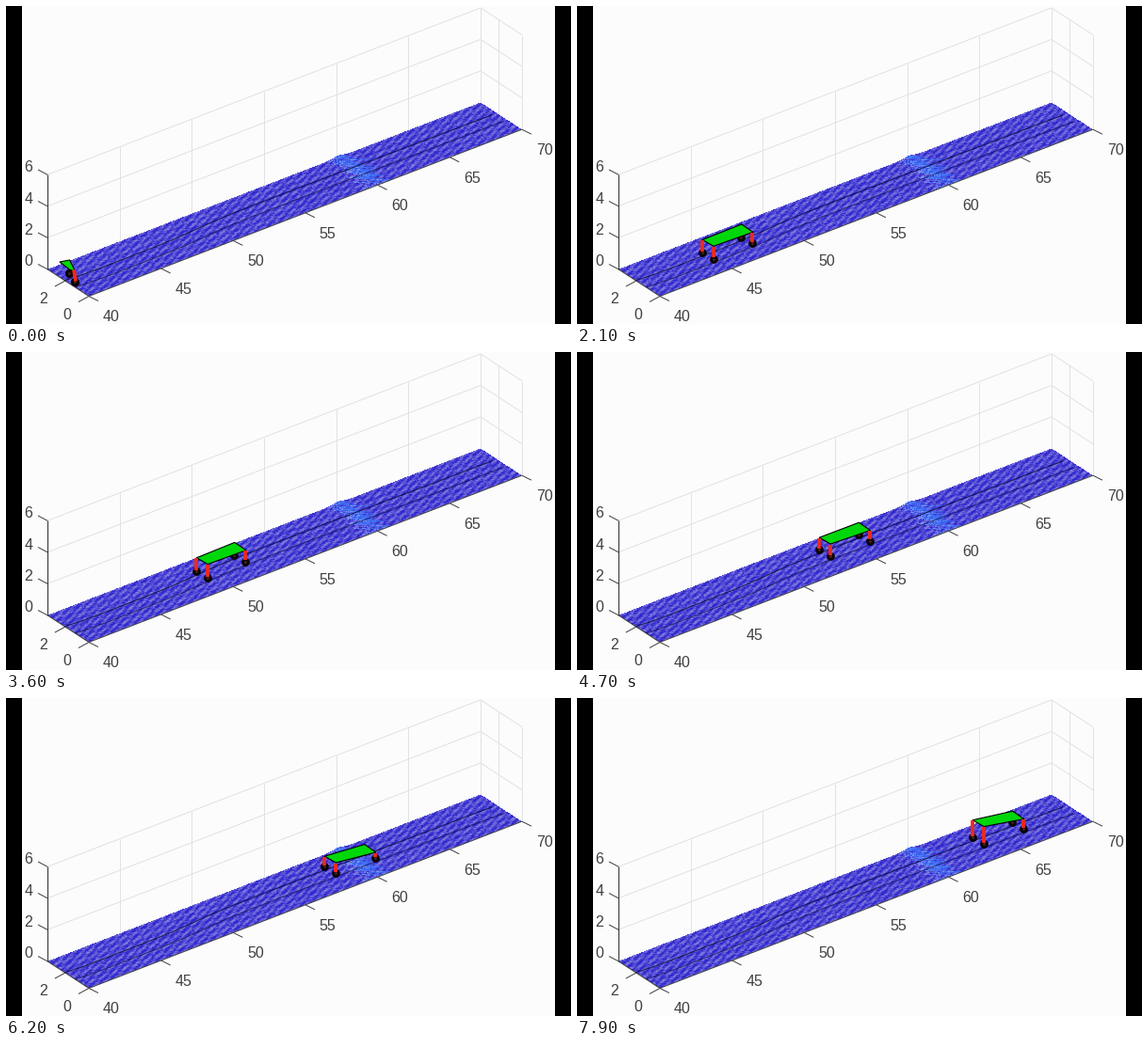
Write a matplotlib script that moves like this. It is 600 px wide and 338 px high and loops after 8000 ms.

```python
import numpy as np
import matplotlib.pyplot as plt
from matplotlib.animation import FuncAnimation
from matplotlib.patches import Polygon, Rectangle

W, H, DPI = 600, 338, 100
PX = 72 / DPI
FRAMES, INTERVAL = 80, 100
Y_MAX, Z_MAX = 3.5, 6
INK, GRID = "#404040", "#e2e2e4"
BUMP = 20.2

# Frames on which the plot is not refreshed
HELD = {4, 9, 15, 17, 20, 25, 33, 39, 41, 49, 57, 63, 65, 71, 73, 76}


def project(u, y, z=0):
    """Axis coordinates (u = x - 40) to stage pixels."""
    return 88 + 15.33 * u - 12.57 * y, 308.5 - 5.91 * u - 8.2 * y - 16.75 * z


def unproject(px, py):
    """Stage pixels on the floor back to (u, y)."""
    a, b = px - 88, 308.5 - py
    det = 15.33 * 8.2 + 12.57 * 5.91
    return (8.2 * a + 12.57 * b) / det, (15.33 * b - 5.91 * a) / det


def lane(u):
    """Lateral position of the left wheels along the road."""
    shift = 0.31 / (1 + np.exp(-(u - 9.3) / 0.9))
    return 2.24 + shift - 0.009 * np.maximum(0, u - 16) + 0.2 * np.exp(-u / 0.7)


def road_texture():
    rng = np.random.default_rng(4)
    px, py = np.meshgrid(np.arange(W) + 0.5, np.arange(H) + 0.5)
    u, y = unproject(px, py)

    # Short light dashes, denser along rows and slanted columns
    noise = rng.random((H, W))
    dash = (noise + np.roll(noise, 1, 1)) / 2
    rows = np.cos(2 * np.pi * y / 0.5)
    columns = np.cos(2 * np.pi * (px + 0.9 * py) / 7.7)
    light = np.clip(0.42 + 0.9 * (dash - 0.5) + 0.2 * rows + 0.3 * columns, 0, 1)

    streak = rng.normal(0, 0.3, (H, 1))
    offset = u - BUMP + streak
    ridge = np.exp(-((offset / 0.5) ** 4))
    foam = np.exp(-(((offset + 0.35) / 0.35) ** 2)) * (noise > 0.45)

    def mix(a, b, t):
        return a + (np.array(b) - a) * t[..., None]

    rgb = np.ones((H, W, 3)) * [48, 38, 206]
    rgb = mix(rgb, [158, 156, 228], 0.72 * light)
    rgb = mix(rgb, [52, 112, 250], 0.75 * ridge)
    rgb = mix(rgb, [150, 180, 250], 0.6 * foam)

    edge = Y_MAX + 0.14 * np.exp(-(((u - BUMP) / 0.5) ** 2))
    inside = (u >= 0) & (u <= 30) & (y >= 0) & (y <= edge)
    return np.dstack([rgb / 255, inside])


fig = plt.figure(figsize=(W / DPI, H / DPI), dpi=DPI, facecolor="#fcfcfd")
ax = fig.add_axes([0, 0, 1, 1])
ax.set_xlim(0, W)
ax.set_ylim(H, 0)
ax.axis("off")


def line(p, q, color, width=1, z=1):
    ax.plot([p[0], q[0]], [p[1], q[1]], color=color, lw=width * PX,
            solid_capstyle="butt", zorder=z)


def label(x, y, value):
    ax.text(x, y, str(value), color=INK, fontsize=16 * PX, ha="center",
            va="center_baseline", family="Liberation Sans", zorder=3)


def draw_axes():
    for u in range(5, 31, 5):
        line(project(u, Y_MAX), project(u, Y_MAX, Z_MAX), GRID)
    for y in (0, 2):
        line(project(30, y), project(30, y, Z_MAX), GRID)
    for z in (2, 4, 6):
        corner = project(30, Y_MAX, z)
        line(project(0, Y_MAX, z), corner, GRID)
        line(corner, project(30, 0, z), GRID)

    left = project(0, Y_MAX)
    line(project(0, 0), project(30, 0), INK, z=3)
    line(project(0, 0), left, INK, z=3)
    line(left, project(0, Y_MAX, Z_MAX), INK, 1.2, z=3)

    for u in range(0, 31, 5):
        x, y = project(u, 0)
        line((x, y), (x + 10, y + 5), INK, z=3)
        label(x + 23.7, y + 20.8, 40 + u)
    for v in (0, 2):
        x, y = project(0, v)
        line((x, y), (x - 11, y + 6), INK, z=3)
        label(x - 22.8, y + 18.4, v)
    for z in (0, 2, 4, 6):
        x, y = project(0, Y_MAX, z)
        line((x, y), (x - 10, y - 5.3), INK, z=3)
        label(x - 20.3, y - 9.3, z)


def draw_tracks():
    u = np.linspace(0.3, 29.9, 300)
    for offset, alpha in ((0, 0.8), (0.88, 0.6)):
        x, y = project(u, lane(u) - offset)
        ax.plot(x, y + 4, color="#08082c", lw=PX, alpha=alpha, zorder=3)


draw_axes()
ax.imshow(road_texture(), extent=(0, W, H, 0), interpolation="nearest",
          aspect="auto", zorder=2)
draw_tracks()
for x in (0, W - 17):
    ax.add_patch(Rectangle((x, 0), 17, H, color="black", lw=0, zorder=9))


class Leg:
    def __init__(self, z):
        self.wheel, = ax.plot([], [], "o", ms=8.2 * PX, mfc="#0a0606",
                              mec="black", mew=0.5 * PX, zorder=z)
        self.hub, = ax.plot([], [], "o", ms=2.6 * PX, mfc="#5a2420",
                            mec="none", zorder=z + 0.1)
        self.strut, = ax.plot([], [], color="#f0281e", lw=3.8 * PX,
                              solid_capstyle="butt", zorder=z + 0.2)

    def place(self, wheel, top, foot):
        self.wheel.set_data([wheel[0]], [wheel[1]])
        self.hub.set_data([wheel[0]], [wheel[1]])
        self.strut.set_data([top[0], foot[0]], [top[1], foot[1]])


# Order: rear left, front left, front right, rear right
legs = [Leg(z) for z in (6, 4, 6, 6.5)]
body = Polygon([(0, 0)] * 4, closed=True, fc="#00d70a", ec="black",
               lw=1.1 * PX, joinstyle="round", zorder=5)
ax.add_patch(body)

KEYS = [11, 21, 36, 47, 62, 79]


def place_folded():
    """Robot still folded up at the start of the road."""
    body.set_xy([(57, 272), (67.5, 270), (73.5, 282), (68, 280.5)])
    rear, front = (67, 283.7), (73, 292.5)
    legs[0].place(rear, (67, 280.5), (67, 281))
    legs[1].place(rear, rear, rear)
    legs[2].place(front, front, front)
    legs[3].place(front, (72, 280.5), (74, 292.5))


def place_rolling(i):
    u = np.interp(i, [1, 3, 5, 8] + KEYS,
                  [0, 0.08, 0.2, 0.6, 1.51, 4.75, 9.4, 13.1, 18.37, 23.67])
    rear = np.interp(i, KEYS, [14, 13.6, 14.5, 13, 11, 18.5])
    front = np.interp(i, KEYS, [12, 12, 12, 11.2, 6, 10.5])
    corners = []
    for leg, du, side, height in zip(legs, (0, 2.75, 2.81, 0.06),
                                     (0, 0, 0.88, 0.88),
                                     (rear, front + 1.5, front, rear)):
        x, y = project(u + du, lane(u + du) - side)
        corners.append((x + 0.5, y - height))
        leg.place((x, y), (x, y - height + 0.5), (x, y - 1.5))
    body.set_xy(corners)


def draw(i):
    if i in HELD:
        i -= 1
    if i == 0:
        place_folded()
    else:
        place_rolling(i)
    return []


anim = FuncAnimation(fig, draw, frames=FRAMES, interval=INTERVAL,
                     init_func=lambda: draw(0), repeat=True, repeat_delay=0)
plt.show()
```
